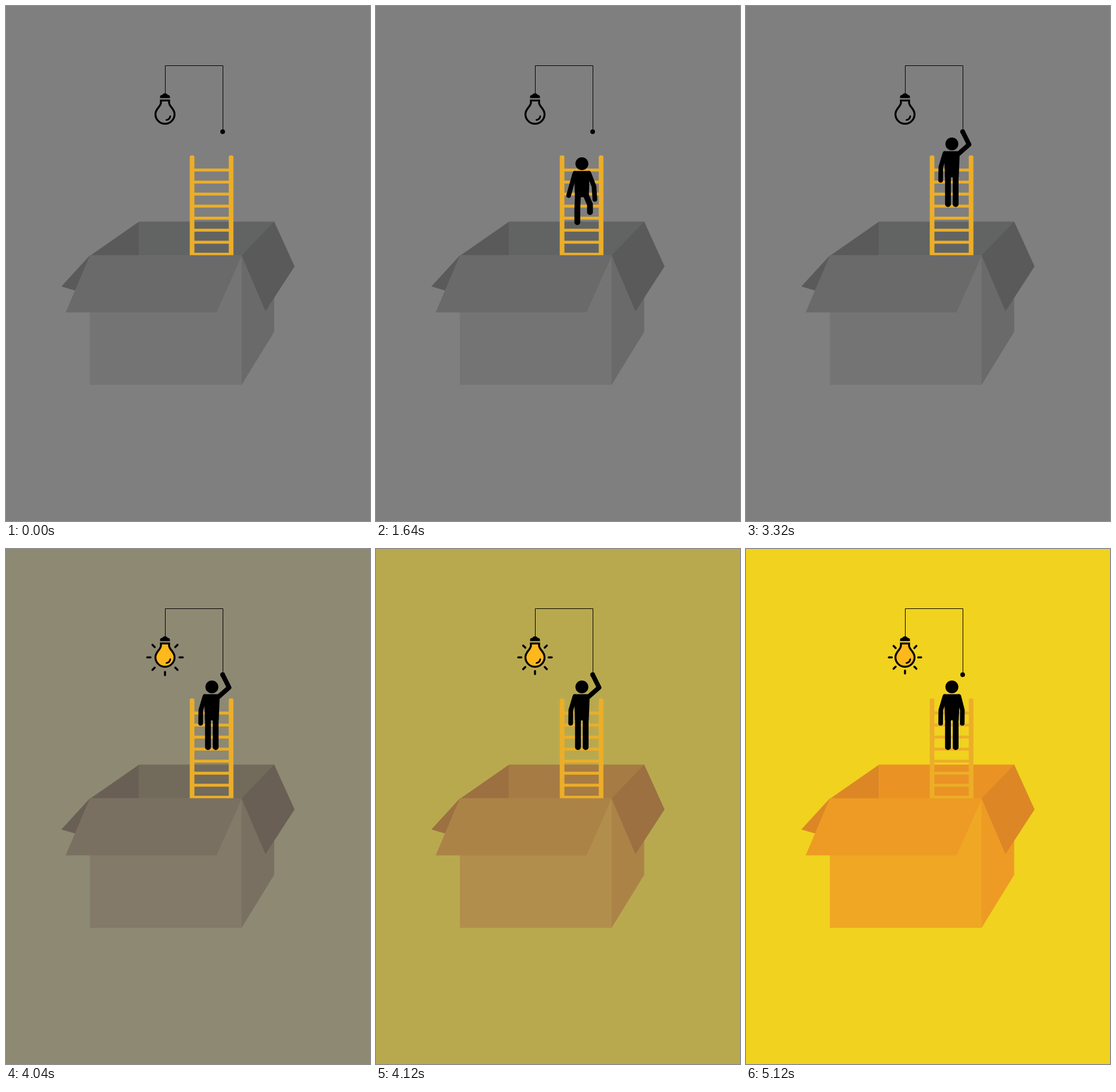
An HTML page with a canvas that plays this animation: 625x885 px, repeating every 8 s.

```html
<!DOCTYPE html>
<html lang="en">
<head>
<meta charset="utf-8">
<title>Out of the box</title>
<style>
  html, body { margin: 0; width: 100%; height: 100%; overflow: hidden; background: #7f7f7f; }
  canvas { display: block; width: 625px; height: 885px; }
</style>
</head>
<body>
<canvas id="stage" width="625" height="885"></canvas>
<script>
const ctx = document.getElementById('stage').getContext('2d');
const LOOP = 8000, STEP = 40;
const LADDER = '#ecae28', GLOW = '#ffb81c';

// Each colour runs from unlit to lit.
const COLORS = {
  sky:   [[127, 127, 127], [240, 210, 31]],
  back:  [[97, 100, 99],   [235, 146, 36]],
  dark:  [[90, 90, 90],    [221, 134, 38]],
  mid:   [[106, 106, 106], [237, 155, 36]],
  front: [[116, 116, 116], [239, 167, 36]]
};

const lerp = (a, b, k) => a + (b - a) * k;
const ramp = (t, from, to) => Math.min(1, Math.max(0, (t - from) / (to - from)));
const shade = (name, k) =>
  `rgb(${COLORS[name][0].map((v, i) => Math.round(lerp(v, COLORS[name][1][i], k))).join(',')})`;

function poly(color, ...p) {
  ctx.fillStyle = color;
  ctx.beginPath();
  for (let i = 0; i < p.length; i += 2) ctx.lineTo(p[i], p[i + 1]);
  ctx.fill();
}

function line(width, ...p) {
  ctx.lineWidth = width;
  ctx.beginPath();
  for (let i = 0; i < p.length; i += 2) ctx.lineTo(p[i], p[i + 1]);
  ctx.stroke();
}

function disc(x, y, r) {
  ctx.beginPath();
  ctx.arc(x, y, r, 0, Math.PI * 2);
  ctx.fill();
}

function drawBoxBack(lit) {
  poly(shade('back', lit), 228.5, 370.5, 461, 370.5, 405, 430, 228.5, 430);
  poly(shade('dark', lit), 228.5, 370.5, 228.5, 430, 143, 430);
}

function drawBoxFront(lit) {
  poly(shade('dark', lit), 144, 428.5, 95, 482, 119, 489, 150, 440);
  poly(shade('front', lit), 144, 428.5, 405, 428.5, 405, 651, 144, 651);
  poly(shade('mid', lit), 404.5, 428.5, 460.5, 370.5, 460.5, 560, 404.5, 651);
  poly(shade('mid', lit), 144, 428.5, 405, 428.5, 361.5, 526.5, 102.5, 526.5);
  poly(shade('dark', lit), 460.5, 370.5, 495.5, 447.5, 445.5, 524.5, 404.5, 428.5);
}

function drawLadder() {
  ctx.fillStyle = LADDER;
  for (const x of [315.5, 382.5]) {
    ctx.beginPath();
    ctx.roundRect(x, 256.7, 8, 172, [3, 3, 0, 0]);
    ctx.fill();
  }
  for (let i = 0; i < 8; i++) ctx.fillRect(322, 279.4 + i * 20.67, 62, 5);
}

const glass = new Path2D('M266 162.4H280V166C280 173 289.4 176 289.4 186' +
  'A16.4 16.4 0 0 1 256.6 186C256.6 176 266 173 266 166Z');
const glint = new Path2D('M282 189.5A7.5 7.5 0 0 1 275.5 195.8');
const cap = new Path2D('M264.5 158.2V156Q264.5 153 268.5 152.8Q269.5 150 273 150' +
  'Q276.5 150 277.5 152.8Q281.5 153 281.5 156V158.2Z');

function rayScale(t) {
  if (t < 4020) return 1.11 * Math.sin(ramp(t, 3800, 4020) * Math.PI / 2);
  const d = t - 4020;
  return 1 + 0.11 * Math.exp(-d / 250) * Math.cos(d * Math.PI / 300);
}

function drawLamp(t, pull) {
  ctx.strokeStyle = ctx.fillStyle = '#000';
  ctx.lineCap = 'butt';
  ctx.lineJoin = 'miter';
  line(1, 273.5, 152, 273.5, 102.5, 372.5, 102.5, 372.5, 214 + pull);
  disc(372, 216 + pull, 4);

  ctx.lineCap = 'round';
  if (t >= 3800) {
    const s = rayScale(t);
    for (let i = -1; i < 6; i++) {
      const a = i * Math.PI / 4, c = Math.cos(a) * s, n = Math.sin(a) * s;
      line(3.5, 273 + c * 22.7, 186.2 + n * 22.7, 273 + c * 27.7, 186.2 + n * 27.7);
    }
    ctx.fillStyle = GLOW;
    ctx.fill(glass);
    ctx.fillStyle = '#000';
  }
  ctx.fill(cap);
  ctx.lineWidth = 3.3;
  ctx.stroke(glass);
  ctx.lineWidth = 2.8;
  ctx.stroke(glint);
}

// Distance still to climb.
function climbLeft(t) {
  return t < 1680 ? 34 + (1640 - t) * 0.104 : 29.8 * (1 - ramp(t, 1680, 2220)) ** 2;
}

function drawLeg(x, side, k) {
  const foot = x + side * 7.5 * k;
  line(10, x, 290, foot, 316 - 9 * k, foot, 340.5 - 20.5 * k);
}

function drawRaisedArm(u, pull) {
  const rad = Math.PI / 180;
  const a = lerp(14, 131.5, u * u) * rad, b = 206.5 * u ** 0.7 * rad;
  const upper = lerp(24.2, 23.4, u), fore = lerp(22.5, 24.6, u);
  const ex = 365.5 + Math.sin(a) * upper, ey = 253.5 + Math.cos(a) * upper;
  line(8, 365.5, 253.5, ex, ey + pull * 0.6,
    ex + Math.sin(b) * fore, ey + Math.cos(b) * fore + pull);
}

function drawMan(t, pull) {
  const stride = 1 - ramp(t, 1900, 2200);
  const w = (1 + Math.cos((t - 1583) * Math.PI / 240)) / 2;
  const kr = 1.14 * w * stride, kl = 1.14 * (1 - w) * stride;
  const reach = t < 4260 ? ramp(t, 2520, 3320) : 1 - ramp(t, 4260, 5120);
  const sway = 3 * Math.sin(reach * Math.PI);

  ctx.save();
  ctx.translate(0, climbLeft(t));
  ctx.strokeStyle = ctx.fillStyle = '#000';
  ctx.lineCap = ctx.lineJoin = 'round';
  disc(353.5, 237, 11.1);
  poly('#000', 339.5, 249.5, 367, 249.5, 366.3, 270, 365.3, 294.5, 341.7, 294.5, 340.7, 270);
  drawLeg(346.8, -1, kl);
  drawLeg(360, 1, kr);
  line(8, 341.5, 253.5, 334.5 + 2 * kr - sway / 2, 277 - 6 * kr,
    334.2 - 3.5 * kr - sway, 299.5 - 8 * kr);
  if (reach > 0) drawRaisedArm(reach, pull);
  else line(8, 365.5, 253.5, 371.5 + 2.7 * stride + kl, 277 - 5 * kl,
    371.3 + 4 * stride + 3 * kl, 299.5 - 8 * kl);
  ctx.restore();
}

function draw(t) {
  const lit = ramp(t, 4014, 4226);
  const pull = 6 * Math.sin(ramp(t, 3400, 3840) * Math.PI);
  ctx.fillStyle = shade('sky', lit);
  ctx.fillRect(0, 0, 625, 885);
  drawBoxBack(lit);
  drawLadder();
  drawLamp(t, pull);
  if (t >= STEP) drawMan(t, pull);
  drawBoxFront(lit);
}

const start = performance.now();
function tick() {
  const t = (performance.now() - start) % LOOP;
  draw(Math.floor(t / STEP) * STEP);
  requestAnimationFrame(tick);
}
tick();
</script>
</body>
</html>
```
